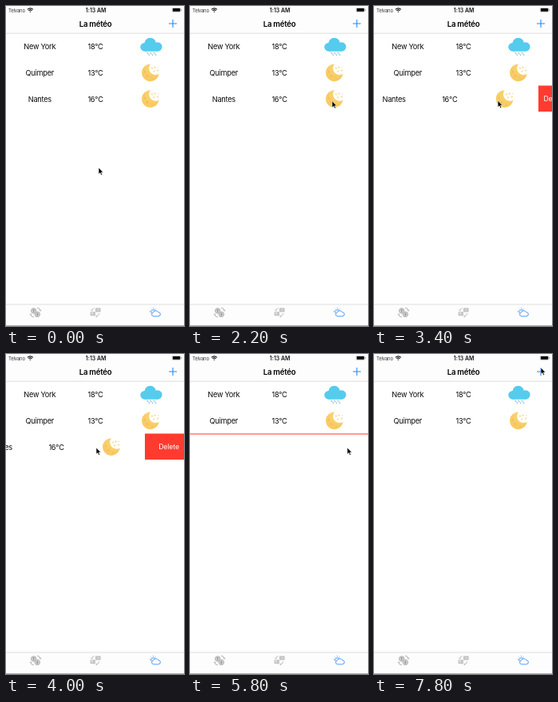
These frames come from a looping animation (223x400 px, 8 s). An HTML page:

```html
<!DOCTYPE html>
<html lang="fr">
<head>
<meta charset="utf-8">
<title>La météo</title>
<style>
html, body { margin: 0; width: 100%; height: 100%; overflow: hidden; background: #fff; }
svg { display: block; width: 100vw; height: 100vh; }
text { font-family: Inter, "Liberation Sans", sans-serif; }
.row text { font-size: 9.2px; letter-spacing: -.25px; text-anchor: middle; fill: #0c0c0c; }
</style>
</head>
<body>
<svg viewBox="0 0 223 400" xmlns="http://www.w3.org/2000/svg">
  <defs>
    <clipPath id="rowClip"><rect id="clipBox" x="0" y="99.4" width="223" height="32.6"/></clipPath>
    <g id="rain">
      <g fill="#55cbed">
        <circle cx="-8" cy="1.3" r="5.4"/><circle cx="-1" cy="-2.8" r="7.4"/>
        <circle cx="8.2" cy="1" r="5.7"/><rect x="-8" y="-2" width="16.2" height="8.7"/>
      </g>
      <path d="M-5 7.8l1 1.8M-.8 7.8l1 1.8M3.5 7.8l1 1.8M-3 10l1 1.8M1.2 10l1 1.8M5.3 10l1 1.8"
        stroke="#6cb8d8" stroke-width=".9" stroke-linecap="round"/>
    </g>
    <g id="moon">
      <path d="M0-10.7A10.8 10.8 0 1 0 10.6 1.5A8.2 8.2 0 0 1 0-10.7Z" fill="#f9d069"/>
      <path d="M-6.5-8.6A10.8 10.8 0 1 0 10.6 1.5A10.4 10.4 0 0 1-6.5-8.6Z" fill="#f4c25f" opacity=".4"/>
      <g fill="#ecb853" opacity=".6">
        <circle cx="-7" cy="-1" r="1.1"/><circle cx="-4" cy="4.5" r="1.4"/><circle cx="2" cy="7.4" r="1"/>
      </g>
      <g fill="#f3d890">
        <path id="star" d="M5.6-8.2l.5 1.2 1.2.5-1.2.5-.5 1.2-.5-1.2-1.2-.5 1.2-.5Z"/>
        <use href="#star" x="-3.6" y="1"/><use href="#star" x="-1.4" y="4.8"/><use href="#star" x="3.4" y="4"/>
        <circle cx="9.6" cy="-6.6" r=".6"/>
      </g>
    </g>
  </defs>
  <rect width="223" height="400" fill="#fff"/>

  <rect width="223" height="34" fill="#fdfdfd"/>
  <rect y="33.8" width="223" height=".6" fill="#c6c6c6"/>
  <text x="3" y="7.6" font-size="6" letter-spacing="-.2" fill="#333">Telvano</text>
  <g fill="none" stroke="#111" stroke-width="1.1">
    <path d="M26.9 4.3a5 5 0 0 1 7 0M28.3 5.9a3 3 0 0 1 4.2 0"/>
    <path d="M29.4 7l1 1.1 1-1.1q-1-.8-2 0Z" fill="#111" stroke="none"/>
  </g>
  <text x="112.6" y="7.6" font-size="6.9" font-weight="600" text-anchor="middle" fill="#111">1:13 AM</text>
  <rect x="208.2" y="2.4" width="10.6" height="5" rx="1.2" fill="none" stroke="#888" stroke-width=".5"/>
  <rect x="208.9" y="3.1" width="9.2" height="3.6" rx=".6" fill="#000"/>
  <rect x="219.4" y="4" width=".8" height="1.8" rx=".4" fill="#888"/>
  <text x="112" y="25.6" font-size="9.6" font-weight="600" letter-spacing="-.25" text-anchor="middle">La météo</text>
  <path d="M204 22h10M209 17v10" stroke="#2787f5" stroke-width="1.1"/>

  <g class="row">
    <text x="42.3" y="54.2">New York</text><text x="112" y="54.2">18°C</text>
    <use href="#rain" x="181.7" y="50"/>
    <text x="42.3" y="86.8">Quimper</text><text x="112" y="86.8">13°C</text>
    <use href="#moon" x="181" y="83.3"/>
  </g>
  <g id="lastRow" clip-path="url(#rowClip)">
    <rect id="red" y="99" width="223" height="33" fill="#ff3b30"/>
    <text id="del" y="119" font-size="8.7" letter-spacing="-.1" text-anchor="middle" fill="#fff">Delete</text>
    <g id="cell" class="row">
      <rect id="cellBg" y="99" width="223" height="33"/>
      <text x="42.3" y="119.5">Nantes</text><text x="112" y="119.5">16°C</text>
      <use href="#moon" x="181" y="116"/>
    </g>
  </g>

  <rect y="373" width="223" height="27" fill="#fdfdfd"/>
  <rect y="372.7" width="223" height=".6" fill="#c6c6c6"/>
  <rect y="399" width="223" height="1" fill="#b0b0b0"/>
  <g fill="none" stroke="#b4b4b4" stroke-width="1">
    <g transform="translate(37 383)">
      <circle cx="-2.3" cy="-2" r="3.2" fill="#d0d0d0"/><circle cx="2.3" cy="2.4" r="3.2" fill="#d0d0d0"/>
      <path d="M-2.3-4v4M-3.3-3h2M2.3.5v4M1.3 2.5h2" stroke="#8a8a8a" stroke-width=".8"/>
      <path d="M2-5.8q4 .4 4.2 4M4.8-3l1.4 1.3L7.2-3M-2 6q-4-.2-4.2-4M-7.2 3l1-1.3L-4.8 3"/>
    </g>
    <g transform="translate(112 383)">
      <rect y="-5.6" width="6.6" height="5" rx=".7" fill="#c2c2c2" stroke="none"/>
      <rect x="-6.4" y="-.7" width="6.4" height="5" rx=".7" fill="#c2c2c2" stroke="none"/>
      <path d="M1.7-3.1h3.4M-5-.1l1 2.8 1-2.8M-2 1.9h1" stroke="#f4f4f4" stroke-width=".7"/>
      <path d="M-4.5-2.2q.8-3 3.2-3M-5.6-3.3l1 1.3 1.3-.8M4.7 1q-.4 4-4 4.2M2 3.8L.7 5.2 2 6.3" stroke-width=".8"/>
    </g>
  </g>
  <g transform="translate(187 383)" stroke="#3d92f0" stroke-width=".9" stroke-linecap="round">
    <path d="M-4.9.8A2.8 2.8 0 1 1 .1-1.8M-2.4-5v-.3M-5-3.8l-.2-.2M-6.3-1.2h-.3M.1-3.9l.2-.2" fill="none"/>
    <path d="M-2.6 4.8a2.2 2.2 0 0 1-.2-4.3 3.4 3.4 0 0 1 6.4-.7 2.5 2.5 0 0 1 .6 5Z" fill="#fdfdfd"/>
  </g>

  <path id="cursor" d="M0 0V8.2L1.9 6.5 3.2 9.4 4.6 8.8 3.3 6H5.8Z" fill="#000" stroke="#fff" stroke-width=".6"/>
</svg>
<script>
const LOOP = 8000, STEP = 200, W = 223, ROW = 32.6;
const $ = id => document.getElementById(id);
const set = (id, name, value) => $(id).setAttribute(name, value);

// Each leg eases from the previous place: { from, to, at }
const leg = (from, to, ...at) => ({ from, to, at });
const cursorLegs = [
  leg(600, 1700, 178, 115),   // to the row
  leg(1700, 2300, 178, 119),  // press
  leg(3000, 4000, 113, 117),  // drag left
  leg(4200, 4700, 196, 125),  // to Delete
  leg(4700, 5000, 197, 117),
  leg(6400, 7200, 208, 8),    // to the plus
  leg(7200, 7800, 209, 17)
];
// Cell shift and row height
const rowLegs = [
  leg(3000, 4000, 49, ROW),
  leg(4000, 4600, 39, ROW),
  leg(5200, 5800, W, 1),
  leg(5800, 6200, W, 0)
];

function ease(u) {
  u = Math.min(1, Math.max(0, u));
  return u * u * (3 - 2 * u);
}

function follow(start, legs, t) {
  return legs.reduce((pos, { from, to, at }) => {
    const k = ease((t - from) / (to - from));
    return pos.map((p, i) => p + (at[i] - p) * k);
  }, start);
}

function draw(ms) {
  const t = Math.floor((ms % LOOP) / STEP) * STEP;
  const [x, y] = follow([116, 202], cursorLegs, t);
  const [shift, height] = follow([0, ROW], rowLegs, t);
  set('cursor', 'transform', `translate(${x} ${y})`);
  set('cell', 'transform', `translate(${-shift} 0)`);
  set('cellBg', 'fill', t === 3000 ? '#d9d9d9' : '#fff');
  set('red', 'x', W - shift);
  set('del', 'x', Math.max(204, W + 19.5 - shift));
  set('clipBox', 'height', height);
  set('lastRow', 'visibility', height > 0 ? 'visible' : 'hidden');
}

const start = performance.now();
function tick() {
  draw(performance.now() - start);
  requestAnimationFrame(tick);
}
tick();
</script>
</body>
</html>
```
